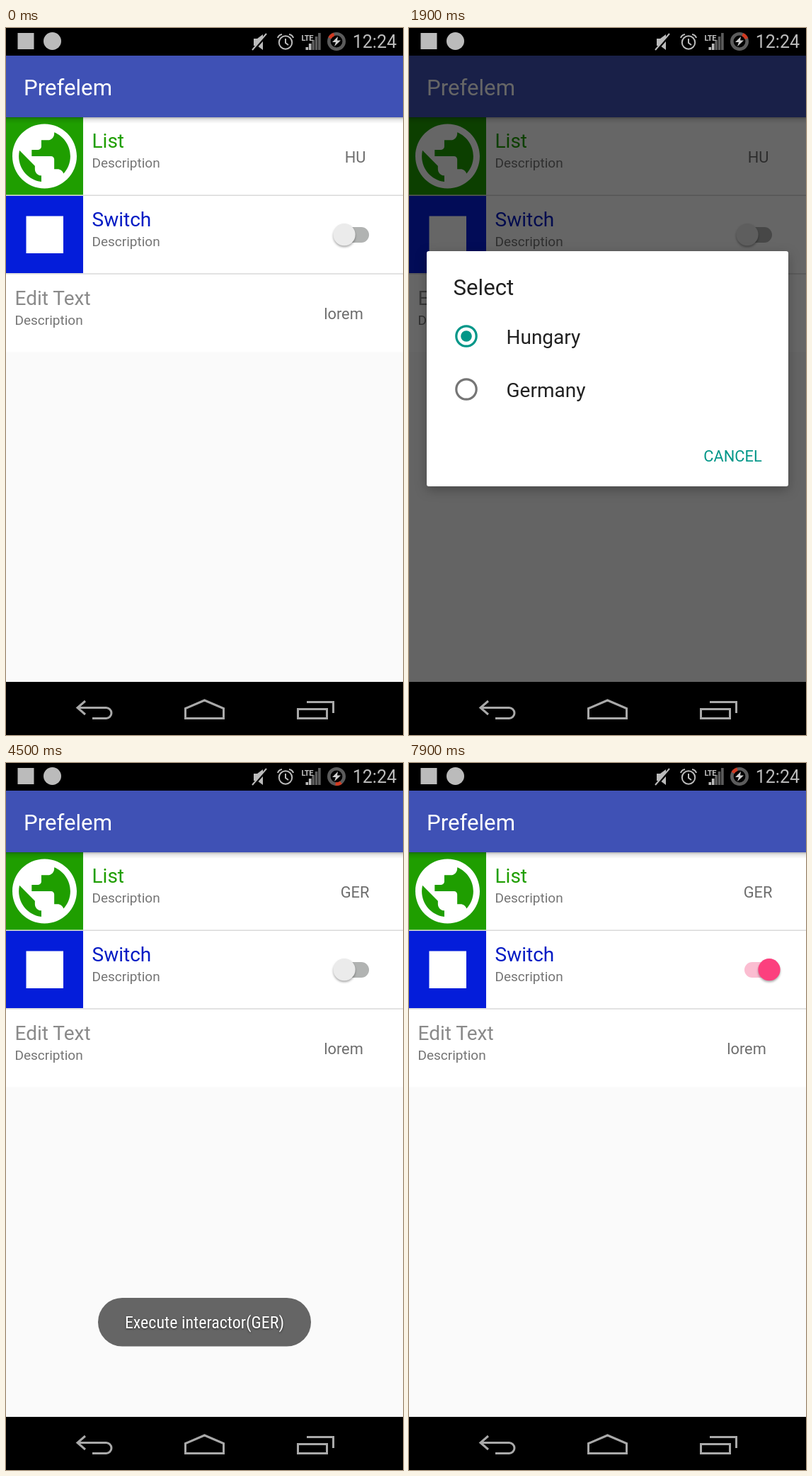
An HTML page that plays this animation: 561 by 998 pixels, repeating every 8 s.

```html
<!DOCTYPE html>
<html lang="en">
<head>
<meta charset="utf-8">
<title>Preference elements</title>
<style>
  html, body { margin: 0; width: 100%; height: 100%; overflow: hidden; background: #000; }
  svg { display: block; width: 100%; height: 100%; font-family: Roboto, sans-serif; }
  .title { font-size: 31.2px; }
  .item { font-size: 28px; }
  .note { font-size: 19px; fill: #757575; }
  .value { font-size: 21.8px; fill: #6e6e6e; text-anchor: middle; }
  .line { fill: none; stroke: #a9a9a9; stroke-width: 3; }
  .status { fill: none; stroke: #bbb; stroke-width: 2; }
  .toast text {
    font-family: "Roboto Condensed", Roboto, sans-serif; font-stretch: 75%;
    font-size: 24px; fill: #fff; text-anchor: middle; text-shadow: 0 1px 3px #0009;
  }
  #arc { transform-origin: 467px 19px; }
  #thumb { filter: drop-shadow(0 2px 1.5px #0005); }
  #panel { filter: drop-shadow(0 5px 8px #0004); }
  #ger, #dim, #dialog, #ripple, .toast { opacity: 0; }
</style>
</head>
<body>
<svg viewBox="0 0 561 998">
  <defs>
    <linearGradient id="shade" x2="0" y2="1">
      <stop stop-color="#000" stop-opacity=".3"/>
      <stop offset=".35" stop-color="#000" stop-opacity=".1"/>
      <stop offset="1" stop-color="#000" stop-opacity="0"/>
    </linearGradient>
  </defs>

  <rect y="39" width="561" height="884" fill="#fafafa"/>
  <rect y="126" width="561" height="331.5" fill="#fff"/>
  <path d="M0 236.2H561M0 347H561" stroke="#d9d9d9" stroke-width="1.6"/>

  <rect y="126" width="109" height="109.5" fill="#1f9e00"/>
  <path transform="translate(-.1 126.4) scale(4.55)" fill="#fff" d="M12 2C6.48 2 2 6.48 2 12s4.48 10 10 10 10-4.48 10-10S17.52 2 12 2zm-1 17.93c-3.95-.49-7-3.85-7-7.93 0-.62.08-1.21.21-1.79L9 15v1c0 1.1.9 2 2 2v1.93zm6.9-2.54c-.26-.81-1-1.39-1.9-1.39h-1v-3c0-.55-.45-1-1-1H8v-2h2c.55 0 1-.45 1-1V7h2c1.1 0 2-.9 2-2v-.41c2.93 1.19 5 4.06 5 7.41 0 2.08-.8 3.97-2.1 5.39z"/>
  <rect y="237" width="109" height="109" fill="#041dda"/>
  <rect x="28.5" y="265.5" width="52.5" height="52.5" fill="#fff"/>

  <text class="item" x="121.5" y="169" fill="#1f9e00">List</text>
  <text class="note" x="121.5" y="197">Description</text>
  <text class="value" id="hu" x="493.5" y="189.5">HU</text>
  <text class="value" id="ger" x="493" y="189.5">GER</text>
  <text class="item" x="121.5" y="280" fill="#041bc4">Switch</text>
  <text class="note" x="121.5" y="308">Description</text>
  <text class="item" x="12.5" y="391" fill="#8a8a8a">Edit Text</text>
  <text class="note" x="12.5" y="418.5">Description</text>
  <text class="value" x="477" y="411">lorem</text>

  <rect id="track" x="474" y="281" width="39" height="22" rx="11" fill="#b1b3b2"/>
  <circle id="thumb" cx="478" cy="291.7" r="15.6" fill="#ebebeb"/>

  <rect y="126" width="561" height="9" fill="url(#shade)"/>
  <rect y="39" width="561" height="87" fill="#3f51b5"/>
  <text class="title" x="25" y="95" fill="#fff">Prefelem</text>

  <rect id="dim" y="39" width="561" height="884"/>

  <g id="dialog">
    <rect id="panel" x="25" y="315" width="511" height="332" rx="3" fill="#fff"/>
    <rect id="ripple" x="25" y="472" width="511" height="75.5" fill="#001010" fill-opacity=".1"/>
    <g fill="#212121">
      <text class="title" x="62.5" y="377">Select</text>
      <text class="item" x="137.5" y="446">Hungary</text>
      <text class="item" x="137.5" y="521">Germany</text>
    </g>
    <g fill="none" stroke-width="3.2">
      <circle cx="81" cy="435" r="14.2" stroke="#009688"/>
      <circle cx="81" cy="510" r="14.2" stroke="#757575"/>
    </g>
    <circle cx="81" cy="435" r="7.8" fill="#009688"/>
    <text x="457.5" y="612" font-size="21.8" text-anchor="middle" fill="#009688">CANCEL</text>
  </g>

  <g class="toast" id="toastGer">
    <rect x="130" y="755" width="301" height="68.5" rx="34.2" fill="#656565"/>
    <text x="280.5" y="798">Execute interactor(GER)</text>
  </g>
  <g class="toast" id="toastTrue">
    <rect x="131" y="755" width="299" height="68.5" rx="34.2" fill="#656565"/>
    <text x="280.5" y="798">Execute interactor(true)</text>
  </g>

  <rect width="561" height="39"/>
  <rect x="16.5" y="7" width="23" height="23" fill="#bbb"/>
  <circle cx="65.5" cy="18.5" r="12.5" fill="#bbb"/>
  <path fill="#bbb" d="M350 15H355L363 9V31L355 25H350Z"/>
  <path d="M370 9L349 32" stroke="#000" stroke-width="3"/>
  <path class="status" d="M368 8L348 31"/>
  <circle class="status" cx="395" cy="20.5" r="9.2"/>
  <path class="status" d="M395 15V21L399 24M384 14Q385 10 390 9M400 9Q405 10 406 14"/>
  <g id="bars"></g>
  <text x="417.5" y="17.5" font-size="11.2" font-weight="bold" letter-spacing="-.6" fill="#bbb">LTE</text>
  <circle cx="467" cy="19" r="10.7" fill="none" stroke="#5c5c5c" stroke-width="4.6"/>
  <circle id="arc" cx="467" cy="19" r="10.7" fill="none" stroke="#d5391f" stroke-width="4.6" pathLength="360" stroke-dasharray="44 316"/>
  <path fill="#d0d0d0" d="M469 12L461 20H466L464 26L473 17.5H468Z"/>
  <text x="552" y="28.3" font-size="25" text-anchor="end" fill="#bbb">12:24</text>

  <rect y="923" width="561" height="75"/>
  <path class="line" d="M112 950L101 959.5L112 969M101 959.5H141.5a7.5 7.5 0 0 1 0 15H122"/>
  <path class="line" d="M253.5 974.5V960.5L280.5 949L307.500 960.5V974.5Z"/>
  <path class="line" d="M412.500 961.5H453.5V974.5H412.500ZM425 951.5H462.500V967"/>
</svg>
<script>
  const LOOP = 8000;
  const OUT = 'cubic-bezier(.33,.67,.67,1)';  // decelerating
  const IN = 'cubic-bezier(.33,0,.67,.33)';   // accelerating
  const el = id => document.getElementById(id);

  // steps: [time in ms, value, easing towards the next step]
  function play(id, prop, steps) {
    const first = steps[0], last = steps[steps.length - 1];
    const all = [[0, first[1]], ...steps, [LOOP, last[1]]];
    el(id).animate(
      all.map(([t, value, easing = 'linear']) => ({ offset: t / LOOP, [prop]: value, easing })),
      { duration: LOOP, iterations: Infinity });
  }

  for (let i = 0; i < 5; i++) {
    const h = 4 + i * 5;
    el('bars').insertAdjacentHTML('beforeend',
      `<rect x="${423.5 + i * 4.4}" y="${31 - h}" width="3.600" height="${h}" fill="${i < 2 ? '#bbb' : '#5c5c5c'}"/>`);
  }

  // Use a smaller size where no condensed face is installed.
  for (const text of document.querySelectorAll('.toast text'))
    if (text.getComputedTextLength() > 235) text.style.fontSize = '21px';

  play('arc', 'transform', [[0, 'rotate(-153deg)'], [LOOP, 'rotate(214deg)']]);
  play('dim', 'opacity', [[250, 0], [470, .6], [2655, .6], [2890, 0]]);
  play('dialog', 'opacity', [[250, 0], [400, 1], [2650, 1], [2780, 0]]);
  play('ripple', 'opacity', [[2400, 0, OUT], [2580, 1]]);
  play('hu', 'opacity', [[2650, 1], [2650, 0]]);
  play('ger', 'opacity', [[2650, 0], [2650, 1]]);
  play('toastGer', 'opacity', [[2840, 0, OUT], [3340, 1], [4990, 1, IN], [5490, 0]]);
  play('toastTrue', 'opacity', [[5000, 0, OUT], [5500, 1], [7000, 1, IN], [7500, 0]]);
  play('thumb', 'transform', [[4700, 'translateX(0px)', 'ease-in-out'], [4950, 'translateX(31px)']]);
  play('thumb', 'fill', [[4700, '#ebebeb'], [4850, '#fc407e']]);
  play('track', 'fill', [[4700, '#b1b3b2'], [4850, '#fbbdd1']]);
</script>
</body>
</html>
```
